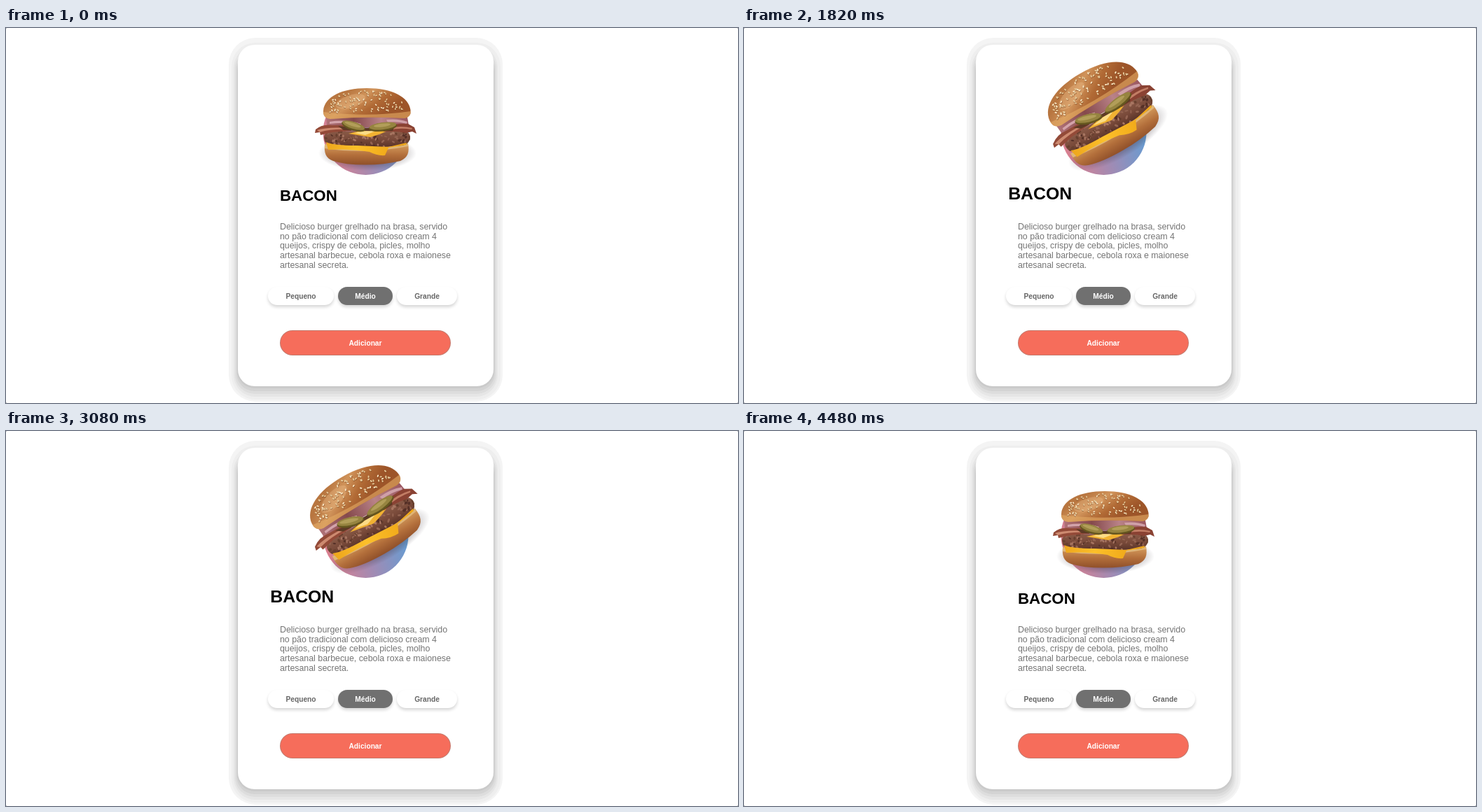
Animation, 1045 px wide and 536 px high, one loop 4.55 s. Source, as an HTML page with a canvas:

```html
<!DOCTYPE html>
<html lang="pt">
<head>
<meta charset="utf-8">
<title>Bacon</title>
<style>
html, body { margin: 0; width: 1045px; height: 536px; overflow: hidden; background: #fff; }
canvas { display: block; }
</style>
</head>
<body>
<canvas id="stage" width="1045" height="536"></canvas>
<script>
const ctx = document.getElementById('stage').getContext('2d');
const LOOP = 4550, STEP = 70, ENTER = 1430, LEAVE = 2860, DURATION = 1000;
const FONT = '"Liberation Sans", Arial, sans-serif';
const CX = 513, CY = 147.5;

// cubic-bezier(.25, .1, .25, 1)
function ease(x) {
  if (x <= 0) return 0;
  if (x >= 1) return 1;
  let lo = 0, hi = 1, u = 0.5;
  for (let i = 0; i < 24; i++) {
    u = (lo + hi) / 2;
    const bx = 0.75 * u * (1 - u) * (1 - u) + 0.75 * u * u * (1 - u) + u * u * u;
    if (bx < x) lo = u; else hi = u;
  }
  return 0.3 * u * (1 - u) * (1 - u) + 3 * u * u * (1 - u) + u * u * u;
}

function hover(t) {
  return ease((t - ENTER) / DURATION) - ease((t - LEAVE) / DURATION);
}

function random(seed) {
  return () => (seed = (seed * 16807) % 2147483647) / 2147483647;
}

function box(x1, y1, x2, y2, r, fill) {
  ctx.beginPath();
  ctx.roundRect(x1, y1, x2 - x1, y2 - y1, r);
  ctx.fillStyle = fill;
  ctx.fill();
}

function shape(d, fill) {
  ctx.fillStyle = fill;
  ctx.fill(new Path2D(d));
}

function oval(x, y, rx, ry, turn, fill) {
  ctx.beginPath();
  ctx.ellipse(x, y, rx, ry, turn, 0, Math.PI * 2);
  ctx.fillStyle = fill;
  ctx.fill();
}

function text(str, x, y, font, fill, align = 'left') {
  ctx.font = font + ' ' + FONT;
  ctx.fillStyle = fill;
  ctx.textAlign = align;
  ctx.fillText(str, x, y);
}

function blend(x1, y1, x2, y2, ...colors) {
  const g = ctx.createLinearGradient(x1, y1, x2, y2);
  colors.forEach((c, i) => g.addColorStop(i / (colors.length - 1), c));
  return g;
}

function card() {
  box(318, 14, 709, 534, 38, '#f4f4f4');
  box(322, 21, 706, 531, 34, '#eeeeee');
  box(325, 26, 702, 527, 31, '#e6e6e6');
  box(327, 30, 700, 523, 28, '#dddddd');
  box(329, 34, 698, 519, 26, '#d3d3d3');
  box(330, 38, 697, 515, 25, '#cacaca');
  box(331, 24, 696, 512, 24, '#ffffff');
}

function pill(label, x1, x2, fill, color) {
  ctx.save();
  ctx.shadowColor = 'rgba(0,0,0,.16)';
  ctx.shadowBlur = 4;
  ctx.shadowOffsetY = 3;
  box(x1, 370, x2, 396, 13, fill);
  ctx.restore();
  text(label, (x1 + x2) / 2, 387, 'bold 10.2px', color, 'center');
}

function disc() {
  ctx.save();
  ctx.beginPath();
  ctx.rect(440, 125, 150, 90);
  ctx.clip();
  oval(513.5, 149, 61, 61, 0, blend(460, 178, 572, 150, '#d97f8f', '#a08bb4', '#669cd2'));
  ctx.restore();
}

function softShadow() {
  ctx.save();
  ctx.translate(516, 179);
  ctx.scale(1, 0.36);
  const g = ctx.createRadialGradient(0, 0, 40, 0, 0, 70);
  g.addColorStop(0, 'rgba(60,50,60,.4)');
  g.addColorStop(1, 'rgba(60,50,60,0)');
  oval(0, 0, 70, 70, 0, g);
  ctx.restore();
}

function speckle(seed, count, area, size, colors) {
  const rnd = random(seed);
  ctx.save();
  ctx.clip(new Path2D(area));
  for (let i = 0; i < count; i++) {
    oval(453 + rnd() * 124, 146 + rnd() * 27, size * (0.5 + rnd()), size * (0.4 + rnd() * 0.5),
      rnd() * 3, colors[i % colors.length]);
  }
  ctx.restore();
}

function seeds() {
  const rnd = random(4127);
  for (let i = 0; i < 95; i++) {
    const x = (rnd() * 2 - 1) * 53;
    const top = 89 + 32 * (1 - Math.sqrt(1 - (x / 59) ** 2));
    const y = top + (121 - top) * rnd() ** 1.3;
    const turn = rnd() * 3;
    oval(515 + x, y + 0.7, 1.7, 1.1, turn, 'rgba(110,55,20,.55)');
    oval(515 + x, y, 1.6, 0.9, turn, i % 3 ? '#e8cb9a' : '#fbe8c4');
  }
}

function burger() {
  softShadow();

  // lower bun
  shape('M455 166 Q515 174 574 165 C576 178 574 185 563 190 Q540 195.5 513 195.5 Q484 195.5 467 190 C456 186 454 178 455 166Z',
    blend(0, 167, 0, 196, '#d39a5c', '#b36f3b', '#8f4f29'));
  shape('M455 166 Q515 178 574 165 L574 169 Q515 181 455 172Z', '#dfb678');

  // patty
  const patty = 'M454 157 Q453 149 466 148 L564 146 Q577 148 577 156 Q577 165 566 168 Q515 173 464 168 Q454 165 454 157Z';
  shape(patty, blend(0, 147, 0, 172, '#8a5b48', '#784939', '#543026'));
  speckle(91, 130, patty, 2, ['#a87662', '#553027', '#946452', '#68402f']);

  // cheese
  shape('M457 163 Q468 168 500 168 L546 170 L572 164 L571 167 L546 171 L541 182 Q530 183 519 177 Q488 172 460 174Z',
    blend(456, 165, 545, 182, '#eda51c', '#fcc02a', '#f1aa1a'));
  shape('M489 151 L514 145 L548 145 Q538 151 520 156Z', '#f1b232');
  shape('M497 150 L520 146 L526 148 L513 153Z', '#fbdc86');

  // onion
  shape('M457 128 Q515 124 573 128 L575 139 Q515 146 458 139Z',
    blend(457, 0, 575, 0, '#b07278', '#85494c', '#b98288', '#9a565f'));
  shape('M462 134 Q485 130 507 137 L505 139 Q484 134 462 137Z', '#d3a3aa');
  shape('M543 131 Q560 129 573 134 L572 137 Q558 133 545 135Z', '#cfa0a8');

  // bacon
  shape('M442 145 Q452 137 466 139 L492 139 L493 147 Q478 148 466 149 L449 153 L448 149 L441 150Z', '#934a38');
  shape('M444 146 Q458 141 489 143 L488 145 Q464 144 448 149Z', '#cd8a70');
  shape('M540 141 Q558 136 574 137 L583 142 L586 151 L580 148 L571 150 Q557 147 539 148Z', '#8a4233');
  shape('M546 143 Q564 139 580 143 L579 145 Q563 142 546 146Z', '#c27d65');
  shape('M474 140 Q515 146 555 140 L552 147 Q515 148 482 146Z', '#5d3a26');

  // pickles
  for (const [x, y, turn] of [[496, 139, 0.3], [538, 140, -0.12]]) {
    oval(x, y + 1.5, 22 - Math.abs(turn) * 15, 6, turn, '#65561f');
    oval(x, y, 21 - Math.abs(turn) * 15, 5, turn, '#968440');
    oval(x - 1, y - 1, 12, 2.4, turn, '#b29e59');
  }

  // upper bun
  shape('M453 118 C455 98 480 86 515 86 C552 86 575 99 577.5 117 Q579 127 569 129 Q515 126 463 130 Q452 129 453 118Z',
    blend(495, 86, 525, 131, '#b87640', '#d0935a', '#b16a35', '#9d5529'));
  shape('M453 120 Q515 128 578 119 Q578 128 569 129 Q515 126 463 130 Q453 129 453 120Z', 'rgba(228,172,102,.6)');
  oval(492, 105, 22, 9, -0.3, 'rgba(240,200,150,.3)');
  seeds();
}

function draw(p) {
  ctx.fillStyle = '#fff';
  ctx.fillRect(0, 0, 1045, 536);
  ctx.fillStyle = '#bbb';
  for (const x of [0, 1044]) for (const y of [0, 535]) ctx.fillRect(x, y, 1, 1);
  card();
  disc();

  ctx.save();
  ctx.translate(CX, CY - 30 * p);
  ctx.rotate(-Math.PI / 4 * p);
  ctx.scale(1 + 0.22 * p, 1 + 0.22 * p);
  ctx.translate(-CX, -CY);
  burger();
  ctx.restore();

  ctx.save();
  ctx.translate(CX, 240 - 5 * p);
  ctx.scale(1 + 0.17 * p, 1 + 0.17 * p);
  text('BACON', -122, 7.4, 'bold 22.3px', '#000');
  ctx.restore();

  [
    'Delicioso burger grelhado na brasa, servido',
    'no pão tradicional com delicioso cream 4',
    'queijos, crispy de cebola, picles, molho',
    'artesanal barbecue, cebola roxa e maionese',
    'artesanal secreta.'
  ].forEach((line, i) => text(line, 391, 288 + i * 13.7, '12.37px', '#747474'));

  pill('Pequeno', 374, 468, '#fff', '#666');
  pill('Grande', 558, 644, '#fff', '#666');
  pill('Médio', 474, 552, '#707070', '#fff');

  box(391, 432, 635, 468, 18, '#c4796d');
  box(392, 433, 634, 467, 17, '#f66d5b');
  text('Adicionar', 513, 454, 'bold 10.2px', '#fff', 'center');
}

const start = performance.now();
function frame() {
  const t = (performance.now() - start) % LOOP;
  draw(hover(Math.floor(t / STEP) * STEP));
  requestAnimationFrame(frame);
}
frame();
</script>
</body>
</html>
```
